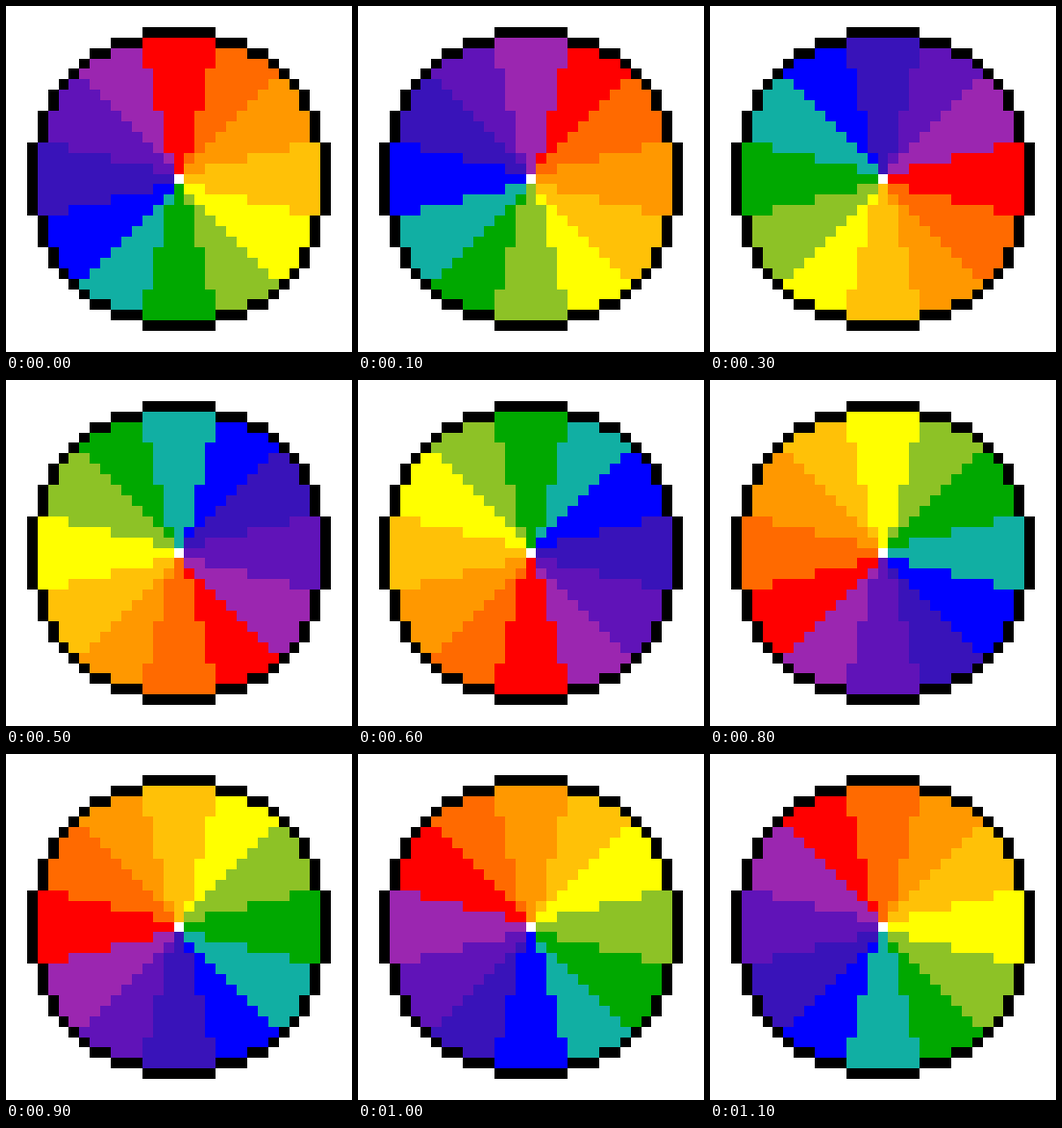
An HTML page with a canvas for the animation above (1.2 s loop, 360 px wide and 360 px high).

```html
<!DOCTYPE html>
<html lang="en">
<head>
<meta charset="utf-8">
<title>Turning colour wheel</title>
<style>
  html, body { margin: 0; width: 100%; height: 100%; overflow: hidden; background: #fff; }
  canvas { display: block; width: 360px; height: 360px; image-rendering: pixelated; }
</style>
</head>
<body>
<canvas id="wheel" width="33" height="33"></canvas>
<script>
const ctx = document.getElementById('wheel').getContext('2d');
const CENTER = 16, RADIUS_SQ = 210, STEP_MS = 100;

// Clockwise from twelve o'clock
const colors = ['#ff0000', '#ff6a00', '#ff9800', '#ffc107', '#ffff00', '#8dc226',
                '#00a800', '#11afa3', '#0000ff', '#3913b9', '#6013b8', '#9b26b0'];

// Clock position (0 to 11) of the wedge that holds a cell
function wedge(dx, dy) {
  const ax = Math.abs(dx), ay = Math.abs(dy);
  if (ax <= ay * 0.24 + 0.5) return dy < 0 ? 0 : 6;
  if (ay <= ax * 0.24 + 0.5) return dx > 0 ? 3 : 9;
  const hour = ax >= ay ? 2 : 1;
  if (dx > 0) return dy < 0 ? hour : 6 - hour;
  return dy > 0 ? 6 + hour : 12 - hour;
}

function cellColor(dx, dy, step) {
  const far = Math.max(Math.abs(dx), Math.abs(dy));
  const near = Math.min(Math.abs(dx), Math.abs(dy));
  if (far === 0 || far ** 2 + near ** 2 > RADIUS_SQ) return '#fff';
  if ((far + 1) ** 2 + near ** 2 > RADIUS_SQ) return '#000';
  return colors[(wedge(dx, dy) - step + 12) % 12];
}

function draw(step) {
  for (let y = 0; y < 33; y++) {
    for (let x = 0; x < 33; x++) {
      ctx.fillStyle = cellColor(x - CENTER, y - CENTER, step);
      ctx.fillRect(x, y, 1, 1);
    }
  }
}

const start = performance.now();
function tick() {
  draw(Math.floor((performance.now() - start) / STEP_MS) % 12);
  requestAnimationFrame(tick);
}
tick();
</script>
</body>
</html>
```
